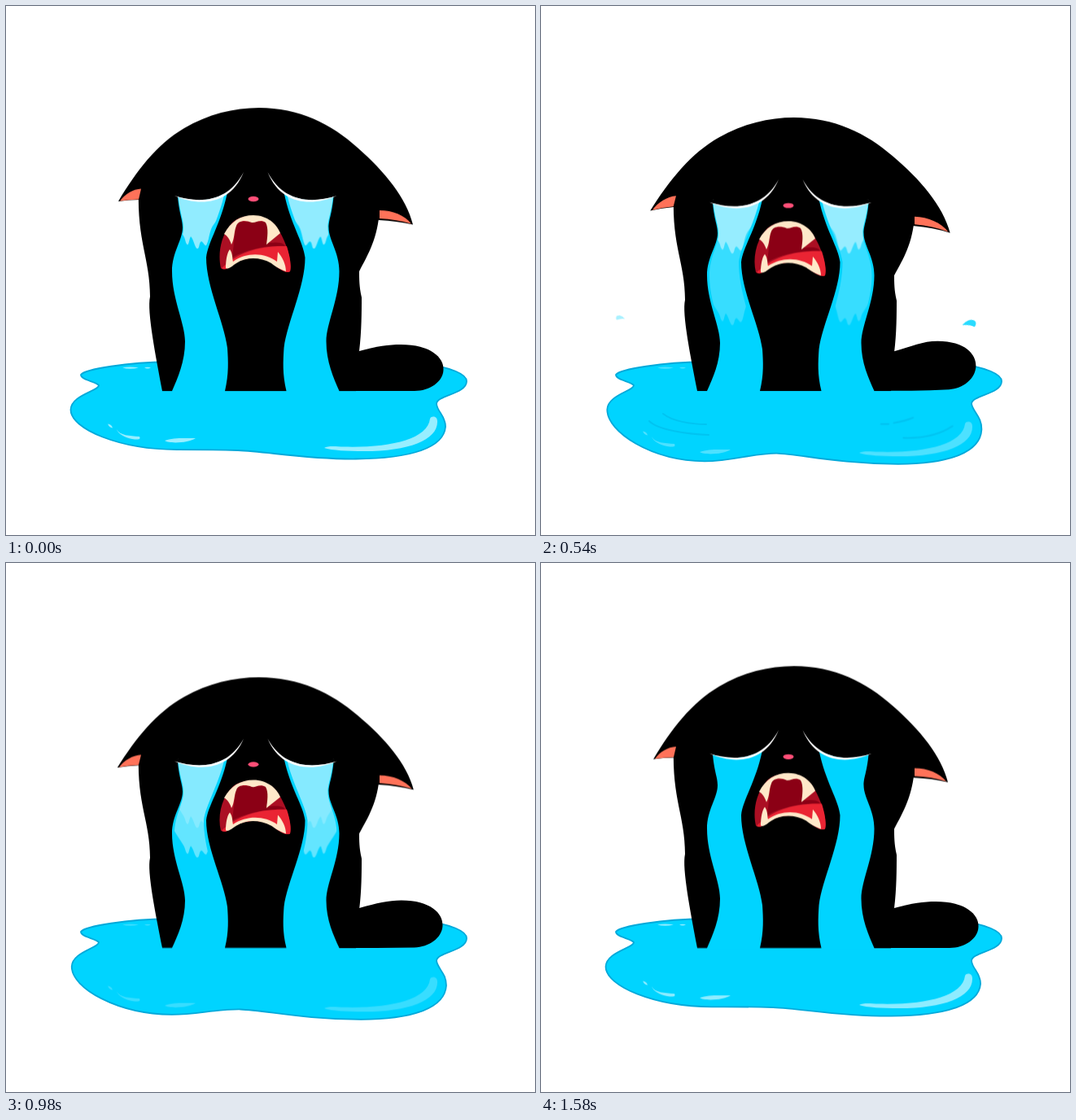
An HTML page without scripts that plays this animation: 650 px wide and 650 px high, repeating every 1.6 s.

```html
<!DOCTYPE html>
<html lang="en">
<head>
<meta charset="utf-8">
<title>Crying cat</title>
<style>
html, body { margin: 0; height: 100%; overflow: hidden; background: #fff; }
svg { display: block; width: 100%; height: 100%; }

/* Every part runs on the same 1.6 s loop; the bob and the glints repeat four times in it. */
.bob, .glint, .flap, .tail, .swell, .shift, .band, .ripple, .drop { animation: 1.6s linear infinite; }

.bob { animation-name: bob; animation-duration: .4s; transform-origin: 0 473px; }
@keyframes bob { 50% { transform: scaleY(.951); } }

.glint { fill: #fff; opacity: .6; animation-name: glint; animation-duration: .4s; }
@keyframes glint { 50% { opacity: .18; } }

.flap { d: var(--rest); animation-name: flap; }
@keyframes flap {
  0%, 12.5%, 37.5%, 62.5%, 87.5%, 100% { d: var(--rest); }
  25%, 50%, 75% { d: var(--out); }
}
.tail { d: var(--rest); animation-name: wag; }
@keyframes wag {
  0%, 12.5%, 37.5%, 62.5%, 100% { d: var(--rest); }
  25%, 50% { d: var(--out); }
}
.swell { d: var(--rest); animation-name: swell; }
@keyframes swell {
  0%, 100% { d: var(--rest); }
  37.5% { d: var(--out); }
}
.shift { animation-name: shift; }
@keyframes shift { 37.5% { transform: translateY(var(--dy)); } }

.head {
  --rest: path("M138 240C160 203 185 170 219 150C248 133 280 125 311 125C360 125 400 145 432 174C466 204 492 236 500 268.5Q480 264 459 263L163 238Q150 238 138 240Z");
  --out: path("M125 252.5C152 209 182 171 219 150C248 133 280 125 311 125C360 125 400 145 432 174C466 203 498 240 509 279.5Q484 267 459 263L163 241Q145 245 125 252.5Z");
}
.left-ear {
  --rest: path("M140 239.5C146 231 156 225 166 224.5L163 237.5Q150 238 140 239.5Z");
  --out: path("M129 250.5C139 237 152 227 166 225L162 240Q146 244 129 250.5Z");
}
.right-ear {
  --rest: path("M459 251C475 251 490 257 498 267.5Q480 262 459 261Z");
  --out: path("M459 251C478 252 497 264 506 277.5Q484 265 459 261Z");
}
.tail {
  --rest: path("M434 424C456 418 470 416 485 416C522 416 538 432 537.5 447C537 462 520 473 502 473C470 473 440 473 408 473Z");
  --out: path("M434 425C456 419 465 401.5 493 401.5C520 402 527 418 527 432C526 450 515 463 500 467C470 473 440 472 408 473Z");
}
.puddle {
  --rest: path("M92 453C97 446 150 438 200 437L520 441C545 444 566 452 566 461C566 477 529 478 529 489C530 499 540 503 540 517C538 542 500 556 430 556.5C365 557 320 547 285 546C250 545 235 545 210 545C140 545 79.5 520 79.5 496C80 478 114 473 114 466C110 461 92 460 92 453Z");
  --out: path("M92 453C97 446 150 438 200 437L520 441C545 444 566 452 566 461C566 477 529 478 529 489C531 499 542 505 541.5 521C540 548 505 563 440 563.5C365 563 318 551 290 550C262 550 235 561 200 561C135 560 81.5 524 81.5 496C82 478 114 473 114 466C110 461 92 460 92 453Z");
}

/* Pale bands slide down both tear streams and fade. */
.band { fill: #fff; opacity: 0; }
.band.a { animation-name: band-a; }
.band.b { animation-name: band-b; }
.band.c { animation-name: band-c; }
@keyframes band-a {
  0% { opacity: .57; transform: none; }
  20% { opacity: .33; transform: translateY(41px); }
  33.75% { opacity: .22; transform: translateY(91px); }
  43%, 100% { opacity: 0; transform: translateY(130px); }
}
@keyframes band-b {
  0%, 16% { opacity: 0; transform: translateY(-4px); }
  20% { opacity: .4; transform: translateY(-3px); }
  33.75% { opacity: .48; transform: none; }
  51.25% { opacity: .52; transform: translateY(26px); }
  70% { opacity: .28; transform: translateY(87px); }
  86.25% { opacity: .1; transform: translateY(104px); }
  92%, 100% { opacity: 0; transform: translateY(115px); }
}
@keyframes band-c {
  0%, 50% { opacity: 0; transform: translateY(-4px); }
  51.25% { opacity: .08; transform: translateY(-3px); }
  70% { opacity: .35; transform: translateY(41px); }
  86.25% { opacity: .12; transform: translateY(104px); }
  94%, 100% { opacity: 0; transform: translateY(135px); }
}

.ripple { fill: none; stroke: #00a0d2; stroke-width: 2; stroke-linecap: round; opacity: 0; animation-name: ripple; }
@keyframes ripple {
  0%, 13% { opacity: 0; transform: none; }
  20% { opacity: .75; transform: none; }
  33.75% { opacity: .3; transform: var(--spread); }
  38%, 100% { opacity: 0; transform: var(--spread); }
}

.drop { fill: #00d4ff; opacity: 0; }
.r1 { animation-name: r1; }
.r2 { animation-name: r2; }
.r3 { animation-name: r3; }
.l1 { animation-name: l1; }
.l2 { animation-name: l2; }
.l3 { animation-name: l3; }
@keyframes r1 {
  0%, 13% { opacity: 0; transform: translate(452px, 424px) rotate(-25deg) scale(.6); }
  15% { opacity: 1; }
  20% { opacity: 1; transform: translate(482px, 398px) rotate(0deg) scale(1); }
  33.75% { opacity: .85; transform: translate(527px, 390px) rotate(20deg) scale(.75); }
  39%, 100% { opacity: 0; transform: translate(549px, 396px) rotate(35deg) scale(.4); }
}
@keyframes r2 {
  0%, 62% { opacity: 0; transform: translate(444px, 422px) rotate(-40deg) scale(.5); }
  64% { opacity: 1; }
  70% { opacity: 1; transform: translate(462px, 382px) rotate(-20deg) scale(.95); }
  86.25% { opacity: .1; transform: translate(552px, 379px) rotate(30deg) scale(.25); }
  87%, 100% { opacity: 0; transform: translate(556px, 380px) rotate(32deg) scale(.2); }
}
@keyframes r3 {
  0%, 78% { opacity: 0; transform: translate(460px, 446px) rotate(-25deg) scale(.5); }
  80% { opacity: 1; }
  86.25% { opacity: 1; transform: translate(496px, 423px) rotate(0deg) scale(.95); }
  97%, 100% { opacity: 0; transform: translate(558px, 414px) rotate(30deg) scale(.4); }
}
@keyframes l1 {
  0%, 13% { opacity: 0; transform: translate(174px, 436px) scale(-.4, .4) rotate(-30deg); }
  15% { opacity: 1; }
  20% { opacity: 1; transform: translate(156px, 410px) scale(-.72, .72) rotate(-25deg); }
  33.75% { opacity: .35; transform: translate(97px, 383px) scale(-.48, .48) rotate(20deg); }
  38%, 100% { opacity: 0; transform: translate(79px, 386px) scale(-.3, .3) rotate(30deg); }
}
@keyframes l2 {
  0%, 38% { opacity: 0; transform: translate(168px, 438px) scale(-.4, .4) rotate(-20deg); }
  40% { opacity: 1; }
  51.25% { opacity: .75; transform: translate(107px, 421px) scale(-.6, .6) rotate(25deg); }
  58%, 100% { opacity: 0; transform: translate(78px, 426px) scale(-.3, .3) rotate(40deg); }
}
@keyframes l3 {
  0%, 68% { opacity: 0; transform: translate(176px, 439px) scale(-.4, .4) rotate(0deg); }
  69.5% { opacity: 1; }
  70% { opacity: 1; transform: translate(173px, 435px) scale(-.45, .45) rotate(0deg); }
  86.25% { opacity: .95; transform: translate(140px, 409px) scale(-.55, .55) rotate(12deg); }
  95%, 100% { opacity: 0; transform: translate(112px, 406px) scale(-.35, .35) rotate(30deg); }
}
</style>
</head>
<body>
<svg viewBox="0 0 650 650">
  <defs>
    <path id="inset" d="M211 230C214 256 218 262 218 272C218 288 207 302 207 326C207 360 222 390 223 412V473H256C260 440 260 420 258 400C256 370 243 345 243 309C245 290 262 262 269 228Z"/>
    <clipPath id="flow">
      <use href="#inset"/>
      <use href="#inset" transform="matrix(-1 0 0 1 613.5 0)"/>
    </clipPath>
    <path id="jag" d="M202 100H274V240C268 256 256 264 252 274C249 282 249 290 246 294C243 294 243 290 240 289C237 290 238 298 235 298C232 297 230 285 227 283C225 286 225 293 223 293C220 291 221 287 218 282C210 268 203 262 202 245Z"/>
    <g id="jags">
      <use href="#jag"/>
      <use href="#jag" transform="matrix(-1 0 0 1 613.5 0)"/>
    </g>
    <g id="stream">
      <path d="M211 234C213 256 217 262 217 272C217 288 204 302 204 326C204 360 220 390 220 412C220 437 211 457 204 473V475H269V473C274 452 273 436 272 420C268 388 246 345 246 309C248 290 264 268 272 229Q242 244 211 234Z"/>
    </g>
    <g id="lid">
      <path d="M207 233C240 243.5 273 240 292 204L250 200Z"/>
      <path fill="#fff" d="M207 233C238 247 276 244 292 204C273 240 240 243.5 207 233Z"/>
    </g>
    <path id="tear" d="M-11 7C-8 -2 -2 -8 5 -7C11 -5 10 3 8 3C2 2 -5 4 -11 7Z"/>
  </defs>

  <path class="swell puddle" fill="#00d4ff" stroke="#00a9da" stroke-width="1.8"/>
  <g class="ripple" style="--spread: translate(-11px, 12px)">
    <path d="M144 498C155 509 190 514 217 515M161 489C172 498 195 502 214 502"/>
  </g>
  <g class="ripple" style="--spread: translate(-97px, -144px) scale(1.31)">
    <path d="M393 502H400M405 501Q416 499 423 496M414 515Q442 516 460 504" stroke-width="1.6"/>
  </g>
  <g class="glint">
    <path d="M143 444.5Q152 442.5 163 444.5Q152 447 143 444.5ZM170 444.5Q174 443 178 444.5Q174 446.5 170 444.5Z"/>
    <path class="shift" style="--dy: 7px" d="M521 507C523 503 530 504 530 510C531 533 495 547 440 547C420 547 400 546 391 543C395 540 405 541 415 541.5C470 543 518 533 521 507Z"/>
    <path class="shift" style="--dy: 10px" d="M125 513.5Q130 514 131 518.5Q127 518 125 513.5ZM136 520C140 528 152 528 164 529C166 533 162 533 155 532C146 530 138 526 136 520Z"/>
    <path class="shift" style="--dy: 15.5px" d="M195 534C205 530 220 531 233 531C225 537 200 538 195 534Z"/>
  </g>

  <path class="tail"/>
  <g class="bob">
    <path d="M163 225C161 290 177 310 177 357C173 375 184 430 192 473H430L434 424C437 400 437 375 437 358C434 345 434 335 434 326C445 305 457 285 459 250Z"/>
    <path class="flap head"/>
    <g fill="#ff7259">
      <path class="flap left-ear"/>
      <path class="flap right-ear"/>
    </g>

    <g fill="#00d4ff">
      <use href="#stream"/>
      <use href="#stream" transform="matrix(-1 0 0 1 613.5 0)"/>
    </g>
    <g clip-path="url(#flow)">
      <g class="band a"><use href="#jags"/></g>
      <g class="band b"><use href="#jags"/></g>
      <g class="band c"><use href="#jags"/></g>
    </g>
    <use href="#lid"/>
    <use href="#lid" transform="matrix(-1 0 0 1 613.5 0)"/>

    <ellipse cx="304" cy="237" rx="6.5" ry="3.2" fill="#ff4f78"/>

    <path fill="#ab0f23" d="M264 322C260 305 264 283 275 270C285 254 320 253 333 272C342 285 352 310 349 326C345 329 338 324 332 320C318 306 292 306 274 321C270 324 266 324 264 322Z"/>
    <path fill="#8b0015" d="M283 265H321L324 291C340 289 342 293 343 295C315 294 295 300 278 309Z"/>
    <path fill="#ea2433" d="M265 322C285 303 310 294 345 295C349 308 351 320 349 326C345 329 338 324 332 320C318 306 292 306 274 321C270 324 267 324 265 322Z"/>
    <g fill="#ffe8c9">
      <path d="M268 280C276 265 288 257 304 257C321 257 333 268 337 279L320 293C321 285 323 273 319 266C312 261 307 267 302 266C293 262 285 264 283 270C280 277 281 286 277 293C275 287 272 282 268 280Z"/>
      <path d="M270 322C270 312 272 302 275 299C279 304 278 312 279 314C296 302 318 303 333 314L334 302C340 309 344 318 344 326C335 323 330 319 326 316C312 308 295 308 283 316C278 319 274 324 270 322Z"/>
    </g>
  </g>

  <use href="#tear" class="drop r1"/>
  <use href="#tear" class="drop r2"/>
  <use href="#tear" class="drop r3"/>
  <use href="#tear" class="drop l1"/>
  <use href="#tear" class="drop l2"/>
  <use href="#tear" class="drop l3"/>
</svg>
</body>
</html>
```
